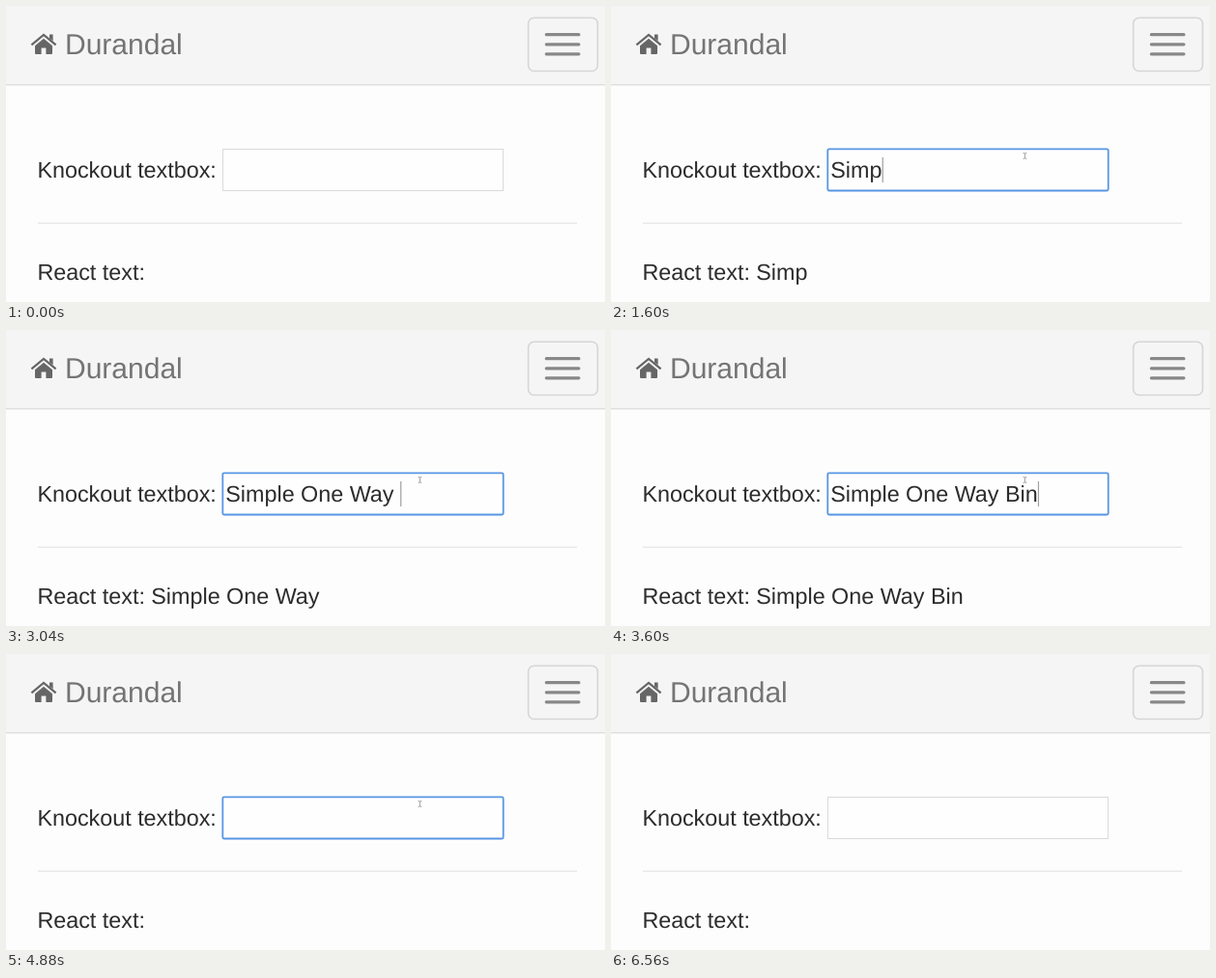
Write an HTML page that moves like this. It is 620 px wide and 307 px high and loops after 7520 ms.

```html
<!DOCTYPE html>
<html lang="en">
<head>
<meta charset="utf-8">
<title>One way binding</title>
<style>
  html, body { margin: 0; width: 100%; height: 100%; overflow: hidden; background: #fdfdfd; }
  svg { display: block; width: 620px; height: 307px; }
  text {
    font: 23.333px "Liberation Sans", Arial, sans-serif;
    fill: #2c2c2c;
    white-space: pre;
    text-rendering: geometricPrecision;
  }
  .brand { font-size: 30px; fill: #747474; }
</style>
</head>
<body>
<svg viewBox="0 0 620 307" xmlns="http://www.w3.org/2000/svg">
  <rect width="620" height="307" fill="#fdfdfd"/>

  <rect width="620" height="81.5" fill="#f5f5f5"/>
  <rect y="81" width="620" height="1.4" fill="#dfdfdf"/>
  <g fill="#666">
    <path d="M30 41.2 39 33.8 48 41.2V49q0 1-1 1H41.4V43.6H36.6V50H31q-1 0-1-1Z"/>
    <path d="M45 29.6h3.6v6.6L45 33.4Z"/>
    <path d="M26.4 40.4 39 30 51.6 40.4" fill="none" stroke="#666" stroke-width="2.2"/>
  </g>
  <text class="brand" x="61" y="50.2">Durandal</text>

  <rect x="540.6" y="12.3" width="71.8" height="55.2" rx="6" fill="none" stroke="#d6d6d6" stroke-width="1.6"/>
  <path d="M559.3 29.7h33.6M559.3 39.8h33.6M559.3 49.8h33.6" stroke="#888" stroke-width="3.2" stroke-linecap="round"/>

  <text x="32.4" y="178.2">Knockout textbox:</text>
  <rect id="idle" x="224.5" y="148.5" width="290" height="43" fill="#fefefe" stroke="#dadada"/>
  <rect id="focus" x="224.3" y="148.3" width="290.4" height="43.2" rx="1.5" fill="#fefefe" stroke="#5896e4" stroke-width="1.8"/>
  <rect id="marked" x="227.5" y="157" height="26" fill="#3290fc"/>
  <text id="field" x="227.3" y="178.2"></text>
  <rect id="caret" y="157" width="1.2" height="26" fill="#a0a0a0"/>
  <path id="beam" d="M426.6 152.6h1.3l.5.5.5-.5h1.3M428.4 153v5M426.6 158.3h1.3l.5-.5.5.5h1.3" fill="none" stroke="#888" stroke-width=".8"/>

  <rect x="33" y="224.6" width="558" height="1.3" fill="#e6e6e6"/>
  <text x="32.4" y="284.4">React text:</text>
  <text id="echo" x="150.3" y="284.4"></text>
</svg>
<script>
const LOOP = 7520;
const FOCUS = 560, SELECT = 4320, CLEAR = 4400, BLUR = 6560;
const BLINKS = [4880, 5280, 5680, 6160];
const PHRASE = "Simple One Way Binding";
const KEYS = [
  960, 1360, 1440, 1600, 1680, 1760, 1920,
  2080, 2240, 2320, 2480,
  2640, 2880, 2960, 3040,
  3280, 3440, 3600, 3680, 3760, 3920, 4000
];

const el = id => document.getElementById(id);
const [idle, focusBox, marked, field, caret, beam, echo] =
  ["idle", "focus", "marked", "field", "caret", "beam", "echo"].map(el);
const passed = (times, t) => times.filter(k => k <= t).length;
const show = (node, on) => node.setAttribute("visibility", on ? "visible" : "hidden");

function draw(t) {
  const active = t >= FOCUS && t < BLUR;
  const selected = t >= SELECT && t < CLEAR;
  const typed = t < CLEAR ? PHRASE.slice(0, passed(KEYS, t)) : "";

  field.textContent = echo.textContent = typed;
  field.style.fill = selected ? "#fff" : "";
  const width = typed ? field.getComputedTextLength() : 0;
  marked.setAttribute("width", width);
  caret.setAttribute("x", 227.5 + width);

  show(idle, !active);
  show(focusBox, active);
  show(beam, active);
  show(marked, selected);
  show(caret, active && !selected && passed(BLINKS, t) % 2 === 0);
}

const start = performance.now();
function tick(now) {
  draw(Math.max(0, now - start) % LOOP);
  requestAnimationFrame(tick);
}
draw(0);
requestAnimationFrame(tick);
</script>
</body>
</html>
```
